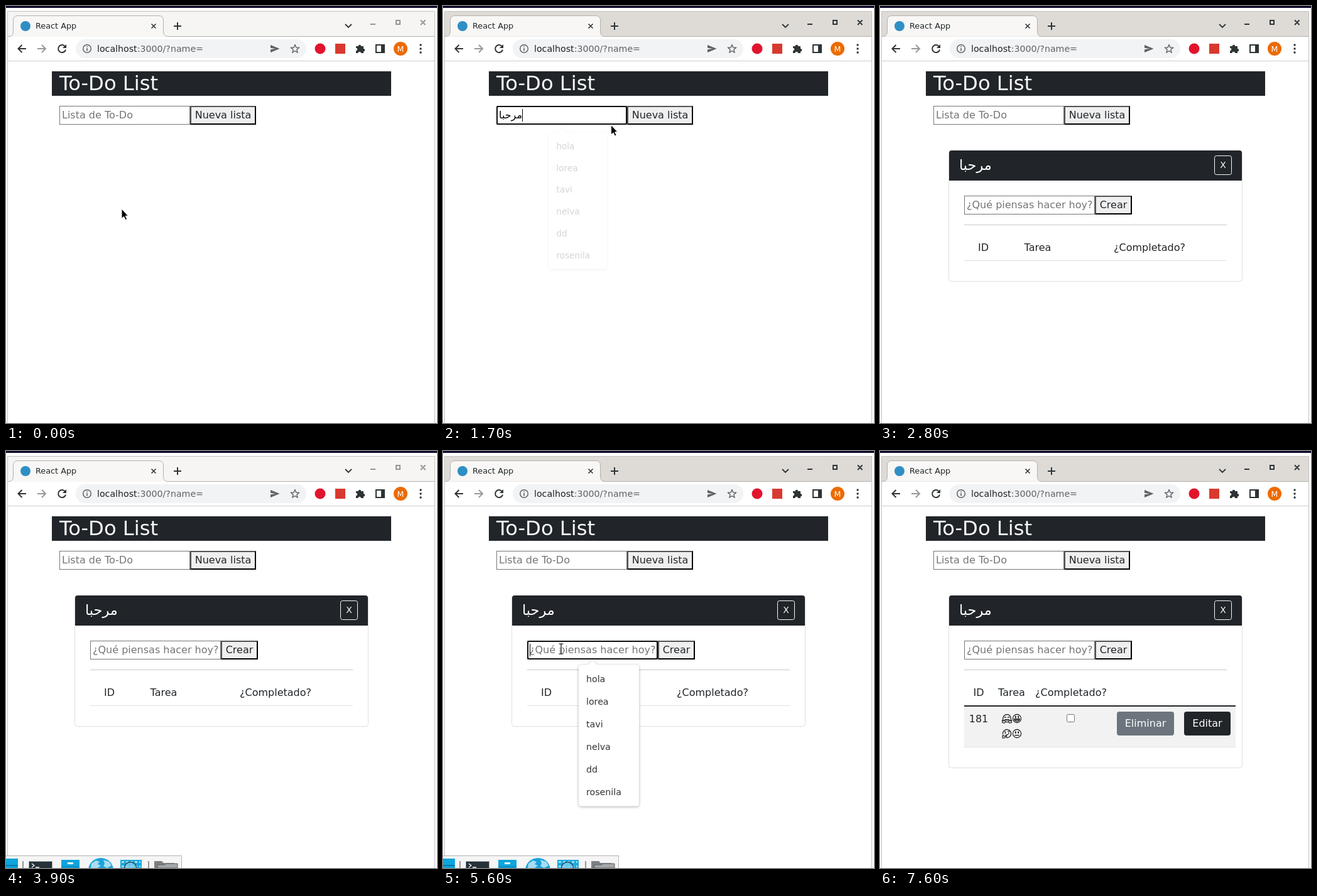
An HTML page that plays this animation: 686 by 664 pixels, repeating every 8 s.

```html
<!DOCTYPE html>
<html lang="es">
<head>
<meta charset="utf-8">
<title>To-Do List</title>
<style>
html, body { margin: 0; width: 100%; height: 100%; overflow: hidden; background: #fff; }
svg { display: block; }
text { font: 16px "DejaVu Sans", sans-serif; fill: #212529; white-space: pre; }
.hint { fill: #757575; }
.mid { text-anchor: middle; }
.line { fill: none; stroke: #2e3436; stroke-width: 2; }
.popup { filter: drop-shadow(0 1px 2px rgba(0,0,0,.32)); }
.popup text { font-size: 14.2px; fill: #333; }
.face { fill: none; stroke: #111; stroke-width: 1.1; stroke-linecap: round; }
</style>
</head>
<body>
<svg width="686" height="664" viewBox="0 0 686 664">
  <defs>
    <g id="hug" class="face">
      <path d="M-6-2A6.3 6.3 0 0 1 6-2M-6 2.5A6.5 6.5 0 0 1-6-2M6 2.5A6.5 6.5 0 0 0 6-2M-2 5.8H2"/>
      <path d="M-4-1.6q1.4-1.8 2.6 0M1.4-1.6q1.2-1.8 2.6 0M-3 1.5q3 3.4 6 0z"/>
      <path d="M-7.3 6.5V2.6l1.5 1.2 2-1 1.6 2-1.8 2.4zM7.3 6.5V2.6L5.8 3.8l-2-1-1.6 2L4 7.2z"/>
    </g>
    <g id="grin" class="face">
      <circle r="6.6"/>
      <path d="M-2.2-3.4v2M2.2-3.4v2" stroke-width="1.8"/>
      <path d="M-4.4.6H4.4A4.4 4 0 0 1-4.4.6zM-4 2.4H4" />
    </g>
    <g id="think" class="face">
      <path d="M-6.5 1A6.6 6.6 0 1 1 5 4.4Q3 6.6-.5 6.6"/>
      <path d="M-4-3.2l2.6.4M1.4-4l3 .6M-2 2.2l4-.8"/>
      <path d="M-2.6-1v.6M2.8-1.2v.6" stroke-width="1.6"/>
      <path d="M-7 7V3.4l1.4-.6 1 1.4L-.4 3.4v1.2L-3 5.6-3.4 7z"/>
    </g>
    <g id="neutral" class="face">
      <circle r="6.6"/>
      <path d="M-2.2-2.8v1.8M2.2-2.8v1.8" stroke-width="1.8"/>
      <path d="M-3.4 2.6H3.4"/>
    </g>
    <g id="button-edge"></g>
  </defs>

  <rect width="686" height="664" fill="#fff"/>
  <rect width="686" height="3" fill="#0c0428"/>

  <!-- window frame and tab strip -->
  <rect id="titlebar" x="3" y="9" width="679" height="40"/>
  <path d="M2.5 664V8.5H682.5V664" fill="none" stroke="#c3c0bd"/>
  <path d="M3 48.5H4Q11.5 48.5 11.5 41V23Q11.5 15.5 19 15.5H243Q250.5 15.5 250.5 23V41Q250.5 48.5 258 48.5H682" fill="#f8f7f5" stroke="#b5b1ac"/>
  <rect x="3" y="49" width="679" height="38" fill="#fff"/>
  <path d="M3 87.5H682" stroke="#cfcdca"/>
  <circle cx="31" cy="32" r="8" fill="#2f8fc4"/>
  <text x="47" y="36" style="font-size:12.8px" fill="#333">React App</text>
  <g class="line">
    <path d="M231.5 28.5l7 7m0-7l-7 7" stroke-width="1.6"/>
    <path d="M273 26v12M267 32h12"/>
    <path d="M540 29l5 5 5-5" stroke-width="1.8"/>
    <path id="controls" d="M580 29h8M621 23h6v6h-6zM660 22.500l7.500 7.500m0-7.500l-7.500 7.500"/>
  </g>

  <!-- toolbar -->
  <g class="line">
    <path d="M32 68H20M25.500 62l-6 6 6 6"/>
    <path d="M50 68H62M57 62l6 6-6 6" stroke="#999"/>
    <path d="M94 64.500A6 6 0 1 0 95 69.500"/>
    <path d="M96 61v6h-6z" fill="#2e3436" stroke="none"/>
  </g>
  <rect x="111" y="53" width="367" height="30" rx="15" fill="#f1f3f4"/>
  <circle cx="129" cy="68" r="6.300" fill="none" stroke="#5f6368" stroke-width="1.500"/>
  <path d="M129 67v4.500M129 64v1.600" stroke="#5f6368" stroke-width="1.600"/>
  <text x="145" y="73" style="font-size:14.2px;fill:#202124">localhost<tspan fill="#5f6368">:3000/?name=</tspan></text>
  <path d="M421 62l14.500 6-14.500 6v-4.700l8-1.300-8-1.300z" fill="#5f6368"/>
  <path id="star" fill="none" stroke="#5f6368" stroke-width="1.400" stroke-linejoin="round"/>
  <circle cx="500" cy="68" r="8.500" fill="#e2142d"/>
  <rect x="524" y="60" width="16" height="16" fill="#d8392f"/>
  <path d="M557 64h3.700a2.300 2.300 0 1 1 4.600 0H569v4a2.300 2.300 0 1 1 0 4.600V75h-4a2.300 2.300 0 0 0-4.600 0H557v-3.700a2.300 2.300 0 0 0 0-4.600z" fill="#2e3436"/>
  <path d="M589 62h13v12h-13z" class="line"/>
  <path d="M597 62h5v12h-5z" fill="#2e3436"/>
  <circle cx="628" cy="68" r="11" fill="#ec6b00"/>
  <text x="628" y="72.500" class="mid" style="font-size:12.500px;fill:#fff">M</text>
  <path d="M660 62v.01M660 68v.01M660 74v.01" stroke="#2e3436" stroke-width="3.400" stroke-linecap="round"/>

  <!-- page -->
  <rect x="73" y="104" width="540" height="39" fill="#212529"/>
  <text x="85" y="134" style="font-size:32.200px;fill:#f8f9fa">To-Do List</text>
  <g id="listForm"></g>

  <g id="card">
    <rect id="cardBox" x="109.500" y="230.500" width="467" rx="4" fill="#fff" stroke="#dfdfdf"/>
    <path d="M110 278V234q0-4 4-4H572q4 0 4 4V278z" fill="#212529"/>
    <text x="126" y="261" style="font-size:22.440px;fill:#fff">مرحبا</text>
    <rect x="532.500" y="238.500" width="27" height="30" rx="3" fill="none" stroke="#f8f9fa"/>
    <text x="546" y="258" class="mid" style="font-size:14px;fill:#f8f9fa">X</text>
    <g id="taskForm"></g>
    <path d="M134 348.500H552" stroke="#c8c9ca"/>
    <g id="emptyTable">
      <text x="164.500" y="390" class="mid">ID</text>
      <text x="251" y="390" class="mid">Tarea</text>
      <text x="429" y="390" class="mid">¿Completado?</text>
      <path d="M134 405.500H552" stroke="#dee2e6"/>
    </g>
    <g id="filledTable">
      <text x="157" y="390" class="mid">ID</text>
      <text x="209.500" y="390" class="mid">Tarea</text>
      <text x="304" y="390" class="mid">¿Completado?</text>
      <rect x="134" y="407" width="432" height="64" fill="#f2f2f2"/>
      <path d="M134 406H566" stroke="#212529" stroke-width="2"/>
      <path d="M134 471.500H566" stroke="#dee2e6"/>
      <text x="157" y="432" class="mid">181</text>
      <use href="#hug" x="202" y="426"/><use href="#grin" x="218" y="426"/>
      <use href="#think" x="202" y="450"/><use href="#neutral" x="218" y="450"/>
      <rect x="297.500" y="419.500" width="12" height="12" rx="2" fill="#fff" stroke="#767676"/>
      <rect x="377" y="415" width="91" height="38" rx="4" fill="#6c757d"/>
      <text x="422.500" y="439" class="mid" style="fill:#fff">Eliminar</text>
      <rect x="484" y="415" width="74" height="38" rx="4" fill="#212529"/>
      <text x="521" y="439" class="mid" style="fill:#fff">Editar</text>
    </g>
  </g>

  <g id="popup" class="popup"></g>

  <!-- desktop dock -->
  <g id="dock">
    <rect x="-4" y="644.500" width="283.500" height="30" fill="#f5f5f5" stroke="#b4b4b4"/>
    <path d="M0 649H19V664H0z" fill="#0ea5dc"/>
    <path d="M0 660H19" stroke="#0879ad" stroke-width="2"/>
    <path d="M27 653v11M227 653v11" stroke="#777" stroke-width="1.500"/>
    <rect x="36.500" y="653.500" width="37" height="20" fill="#263238" stroke="#9aa3a7"/>
    <path d="M41 657l4 3-4 3M47 663h6" fill="none" stroke="#fff" stroke-width="1.300"/>
    <rect x="88" y="651" width="29" height="20" fill="#0ea5dc"/>
    <path d="M88 662H117" stroke="#087bb0"/><path d="M98 656.500h9" stroke="#fff" stroke-width="3"/>
    <circle cx="151" cy="668" r="20" fill="#18a4dc"/>
    <path d="M136 657l7-5 6 2-3 4 5 2-5 4h-11zM155 651l9 3 4 6-7 4-6-3 2-4z" fill="#a9dcf0"/>
    <rect x="182" y="651" width="34" height="20" fill="#18a9e0"/>
    <path d="M184 654.500H214M184 661.500H214" stroke="#9edcf3" stroke-width="3" stroke-dasharray="4 3"/>
    <circle cx="198" cy="664" r="9.500" fill="#7fd0ef" fill-opacity=".8" stroke="#21485a" stroke-width="1.500"/>
    <path d="M236 664V653h12l3 3h17v8z" fill="#7c8083"/>
    <path d="M241 664v-5h11l3-2h18v7z" fill="#a4a8aa" stroke="#5c6063"/>
  </g>

  <g id="cursor" stroke-linejoin="round">
    <path id="arrow" d="M0 0V15.500L3.600 12.300 6.100 17.600 8.600 16.500 6.200 11.200H10.500z" fill="#000" stroke="#fff"/>
    <g id="ibeam" fill="none">
      <path d="M-3.500-8H-1Q0-8 0-7 0-8 1-8H3.500M0-7V7M-3.500 8H-1Q0 8 0 7 0 8 1 8H3.500" stroke="#fff" stroke-width="3"/>
      <path d="M-3.500-8H-1Q0-8 0-7 0-8 1-8H3.500M0-7V7M-3.500 8H-1Q0 8 0 7 0 8 1 8H3.500" stroke="#000" stroke-width="1.200"/>
    </g>
    <path id="hand" d="M-1.500 10V1Q0-1.500 1.500 1V6Q3.500 4.500 4.500 6.500 6.500 5.500 7.300 7.300 9.500 6.500 10 9V12Q9.500 15 8 16.500H0Q-2-13.500-5.500 10-4.500 7.500-1.500 10z" fill="#fff" stroke="#000"/>
  </g>
</svg>
<script>
const LOOP = 8000, STEP = 100;
const $ = id => document.getElementById(id);
const show = (id, on) => { $(id).style.display = on ? '' : 'none'; };
const between = (t, from, to) => t >= from && t < to;

// An input of fixed width followed by a button with a bevelled border.
function buildForm(id, x, y, hint, label, buttonWidth, typed) {
  const bx = x + 208, r = bx + buttonWidth, b = y + 30;
  $(id).innerHTML = `
    <rect x="${bx}" y="${y}" width="${buttonWidth}" height="30" fill="#000"/>
    <path d="M${bx} ${b}V${y}H${r}l-2 2v26H${bx + 2}z" fill="#545454"/>
    <rect x="${bx + 2}" y="${y + 2}" width="${buttonWidth - 4}" height="26" fill="#efefef"/>
    <text x="${bx + buttonWidth / 2}" y="${y + 20}" class="mid">${label}</text>
    <rect x="${x + .5}" y="${y + .5}" width="207" height="29" fill="#fff" stroke="#767676"/>
    <rect id="${id}Ring" x="${x + 1}" y="${y + 1}" width="206" height="28" rx="2" fill="#fff" stroke="#101010" stroke-width="2"/>
    <text id="${id}Hint" class="hint" x="${x + 4}" y="${y + 20}">${hint}</text>
    <g id="${id}Typed">${typed}</g>
    <path id="${id}Caret" d="M.5 ${y + 5}v20" stroke="#000"/>`;
}

function drawForm(id, t, x, endX, times) {
  const typed = between(t, times.type, times.submit);
  show(id + 'Ring', between(t, times.focus, times.blur));
  show(id + 'Hint', !typed);
  show(id + 'Typed', typed);
  const blinkFrom = t >= times.blink ? times.blink : times.active;
  show(id + 'Caret', between(t, times.active, times.blur) && (t - blinkFrom) % 1000 < 500);
  $(id + 'Caret').setAttribute('transform', `translate(${typed ? endX : x + 4})`);
}

const faces = ['hug', 'grin', 'think', 'neutral']
  .map((name, i) => `<use href="#${name}" x="${146 + 16 * i}" y="317"/>`).join('');
buildForm('listForm', 85, 159, 'Lista de To-Do', 'Nueva lista', 105,
  '<text x="89" y="179" style="fill:#000">مرحبا</text>');
buildForm('taskForm', 134, 302, '¿Qué piensas hacer hoy?', 'Crear', 59, faces);

const suggestions = ['hola', 'lorea', 'tavi', 'nelva', 'dd', 'rosenila'];
$('popup').innerHTML =
  '<path d="M4 0H14L22-7 30 0H92q4 0 4 4V221q0 4-4 4H4q-4 0-4-4V4Q0 0 4 0z" fill="#fff"/>' +
  suggestions.map((word, i) => `<text x="12" y="${27.5 + 36 * i}">${word}</text>`).join('');

const starPoints = Array.from({ length: 10 }, (_, i) => {
  const r = i % 2 ? 3 : 7, a = Math.PI * (i / 5 - .5);
  return (460 + r * Math.cos(a)).toFixed(1) + ' ' + (68.5 + r * Math.sin(a)).toFixed(1);
});
$('star').setAttribute('d', `M${starPoints.join('L')}z`);

const listTimes = { focus: 500, active: 900, type: 1500, blink: 1600, blur: 2300, submit: 2600 };
const taskTimes = { focus: 5300, active: 5500, type: 6400, blink: 6500, blur: 7300, submit: 7400 };

// Pointer hotspot: time, x, y
const route = [
  [0, 184, 323], [100, 181, 306], [400, 143, 178], [600, 143, 178], [700, 143, 171],
  [1400, 143, 171], [1700, 267.5, 189.5], [1900, 292, 189.5], [2200, 333, 175], [2400, 335, 174],
  [4800, 40.5, 323.5], [5000, 40.5, 323.5], [5200, 180, 317], [5300, 188, 315],
  [6200, 188, 315], [6600, 330, 312], [6700, 339, 311.5], [6900, 355, 311], [7000, 362, 311]
];

function pointerAt(t) {
  const next = route.findIndex(key => key[0] > t);
  if (next < 0) return route[route.length - 1].slice(1);
  const [t0, x0, y0] = route[next - 1], [t1, x1, y1] = route[next];
  const k = (t - t0) / (t1 - t0);
  return [x0 + (x1 - x0) * k, y0 + (y1 - y0) * k];
}

function drawPointer(t, hasCard) {
  const [x, y] = pointerAt(t);
  const inList = between(y, 159, 189), inTask = hasCard && between(y, 302, 332);
  const overInput = inList && between(x, 85, 293) || inTask && between(x, 134, 342);
  const overButton = inList && between(x, 293, 398) || inTask && between(x, 342, 401);
  show('cursor', t < 2800 || between(t, 4800, 7600));
  show('ibeam', overInput);
  show('hand', overButton);
  show('arrow', !overInput && !overButton);
  $('cursor').setAttribute('transform', `translate(${x} ${y})`);
}

function drawPopup(t) {
  const second = t > 4000;
  const [opens, fadeIn, closes] = second ? [5400, 200, 6400] : [800, 300, 1500];
  const opacity = Math.max(0, Math.min(1, (t - opens) / fadeIn, 1 - (t - closes) / 250));
  const scale = .955 + .045 * opacity;
  const [x, y] = second ? [216, 340.5] : [167, 197.5];
  show('popup', opacity > 0);
  $('popup').style.opacity = opacity;
  $('popup').setAttribute('transform',
    `translate(${x + 48} ${y + 112.5}) scale(${scale}) translate(-48 -112.5)`);
}

function render(ms) {
  const t = Math.floor(ms % LOOP / STEP) * STEP;
  const active = between(t, 900, 3900) || t >= 5500;
  const hasCard = t >= 2600, hasTask = t >= 7400;

  $('titlebar').setAttribute('fill', active ? '#dedbd7' : '#f6f5f4');
  $('controls').style.stroke = active ? '#2e3436' : '#929595';
  show('card', hasCard);
  show('emptyTable', !hasTask);
  show('filledTable', hasTask);
  $('cardBox').setAttribute('height', hasTask ? 274 : 208);
  drawForm('listForm', t, 85, 126, listTimes);
  drawForm('taskForm', t, 134, 202, taskTimes);
  drawPopup(t);
  show('dock', between(t, 3900, 5900));
  $('dock').setAttribute('transform', `translate(0 ${t >= 5800 ? 10 : 0})`);
  drawPointer(t, hasCard);
}

const start = performance.now();
function tick() {
  render(performance.now() - start);
  requestAnimationFrame(tick);
}
tick();
</script>
</body>
</html>
```
